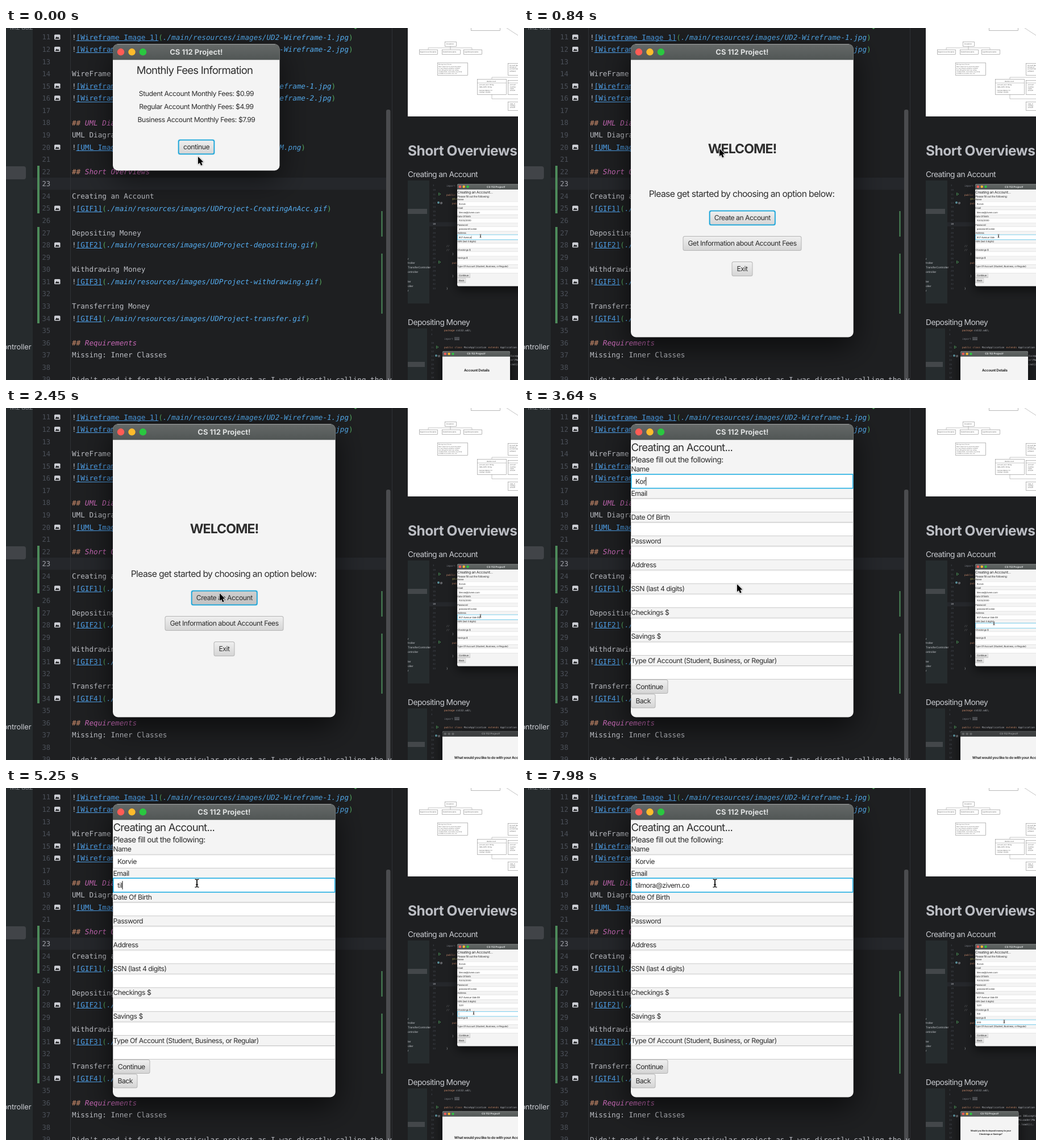
Write an HTML page with a canvas that moves like this. It is 901 px wide and 621 px high and loops after 8000 ms.

```html
<!DOCTYPE html>
<html lang="en">
<head>
<meta charset="utf-8">
<title>Account demo</title>
<style>
html, body { margin: 0; width: 100%; height: 100%; overflow: hidden; background: #1e1f21; }
canvas { display: block; width: 901px; height: 621px; }
</style>
</head>
<body>
<canvas id="stage"></canvas>
<script>
const W = 901, H = 621, LOOP = 8000, MINI = 0.349;
const canvas = document.getElementById('stage');
const dpr = window.devicePixelRatio || 1;
canvas.width = W * dpr;
canvas.height = H * dpr;
const ctx = canvas.getContext('2d');
const UI = 'Inter, "Open Sans", sans-serif';
const MONO = '"DejaVu Sans Mono", "Noto Sans Mono", monospace';
const ROW = 21.57, CODE = 12.65;
const BACK = '#1e1f21', BLUE = '#4fa3ee', PINK = '#c667b4', ORANGE = '#cf8e6d', GREY = '#bcbec4', GREEN = '#54a85f';

const NAME = 'Korvie', EMAIL = 'tilmora@zivem.com', ADDRESS = '907 Avenue Vale 09';
const LABELS = ['Name', 'Email', 'Date Of Birth', 'Password', 'Address', 'SSN (last 4 digits)',
  'Checkings $', 'Savings $', 'Type Of Account (Student, Business, or Regular)'];

const KEYS = {
  name: [3220, 3430, 3640, 3780, 3850, 3920],
  email: [4900, 4970, 5250, 5460, 5530, 5740, 6230, 6440, 7000, 7140, 7350, 7560, 7630, 7770, 7840, 7980],
  address: [70, 210, 420, 560, 700, 1820, 1890, 2170],
  ssn: [3780, 3850, 3920, 4130],
  checkings: [5950, 6090, 6440],
  savings: [7560, 7700, 7840]
};
// [time, x, y]
const MOUSE = [[0, 338, 227], [280, 342, 220], [420, 342, 220], [560, 344, 213], [840, 344, 213],
  [1260, 499, 250], [2030, 499, 250], [2380, 376, 327], [2520, 376, 327], [2590, 375, 311],
  [4130, 375, 311], [4690, 336, 168]];
const MINI_MOUSE = [[0, 835, 367], [2590, 835, 367], [2800, 827, 380], [4130, 827, 380], [4620, 823, 397],
  [6440, 823, 397], [6700, 823, 412], [7700, 823, 412], [7980, 845, 412]];

const pressed = (keys, t) => keys.filter(k => k <= t).length;
const typed = (str, keys, t, base = 0) => str.slice(0, base + pressed(keys, t));

function along(path, t) {
  const i = path.findIndex(p => p[0] > t);
  if (i < 0) return path[path.length - 1].slice(1);
  const a = path[i - 1], b = path[i];
  const u = (t - a[0]) / (b[0] - a[0]), e = u * u * (3 - 2 * u);
  return [a[1] + (b[1] - a[1]) * e, a[2] + (b[2] - a[2]) * e];
}

function rect(x, y, w, h, color) {
  ctx.fillStyle = color;
  ctx.fillRect(x, y, w, h);
}

function round(x, y, w, h, r, color) {
  ctx.beginPath();
  ctx.roundRect(x, y, w, h, r);
  ctx.fillStyle = color;
  ctx.fill();
}

function line(color, width, ...pts) {
  ctx.beginPath();
  pts.forEach(([x, y]) => ctx.lineTo(x, y));
  ctx.strokeStyle = color;
  ctx.lineWidth = width;
  ctx.stroke();
}

function dot(x, y, r, color) {
  ctx.beginPath();
  ctx.arc(x, y, r, 0, 7);
  ctx.fillStyle = color;
  ctx.fill();
}

// y is the middle of the capitals
function text(str, x, y, size, { color = '#2d2d2d', weight = 400, align = 'left', track = -0.04 } = {}) {
  ctx.font = `${weight} ${size}px ${UI}`;
  ctx.letterSpacing = track * size + 'px';
  ctx.fillStyle = color;
  const w = ctx.measureText(str).width;
  const dx = align === 'center' ? w / 2 : align === 'right' ? w : 0;
  ctx.fillText(str, x - dx, y + size * 0.364);
  return w;
}

function code(str, x, y, color = GREY, style = '', size = CODE) {
  ctx.font = `${style} ${size}px ${MONO}`;
  ctx.letterSpacing = '0px';
  ctx.fillStyle = color;
  ctx.fillText(str, x, y + size * 0.364);
  return x + ctx.measureText(str).width;
}

function link(label, path, y) {
  let x = code('!', 116, y);
  const end = code(`[${label}]`, x, y, BLUE);
  rect(x, Math.round(y + 5.7), end - x, 1, BLUE);
  x = code('(', end, y, GREEN);
  x = code('./main/resources/images/' + path, x, y, '#55adf0', 'italic');
  code(')', x, y, GREEN);
}

function heading(str, y) {
  code(str, code('## ', 116, y, ORANGE), y, PINK, 'italic');
}

function picture(x, y) {
  round(x - 5, y - 4.5, 10.5, 9, 1.5, '#ced0d6');
  ctx.beginPath();
  ctx.moveTo(x - 3.5, y + 3);
  ctx.lineTo(x - 1, y - 1);
  ctx.lineTo(x + 0.7, y + 1);
  ctx.lineTo(x + 2, y - 0.5);
  ctx.lineTo(x + 4, y + 3);
  ctx.fillStyle = BACK;
  ctx.fill();
}

function editor() {
  const at = n => 16 + (n - 11) * ROW;
  rect(0, 0, W, H, BACK);
  rect(0, 0, 47, H, '#262b2d');
  round(-6, 244, 41, 23, 4, '#414448');
  text('M2 uu2', 47, -1, 12, { color: '#777b80', align: 'right' });
  text('ontroller', 44.5, 562, 13, { color: '#ced0d6', align: 'right', track: -0.01 });
  ctx.save();
  ctx.beginPath();
  ctx.rect(47, 0, 632, H);
  ctx.clip();
  rect(47, 264, 622, 21.5, '#25272b');
  rect(113, 0, 1, H, '#303236');
  const pics = [11, 12, 15, 16, 20, 25, 28, 31, 34];
  for (let n = 11; n < 40; n++) {
    code(String(n), 63.5, at(n), n === 23 ? '#a1a3ab' : '#4b5059', '', 12.2);
    if (pics.includes(n)) picture(90, at(n));
  }
  rect(55, 243, 4, 84, '#4d8a5a');
  rect(55, 351, 4, 170, '#4d8a5a');
  for (const i of [1, 2]) {
    link('Wireframe Image ' + i, `UD2-Wireframe-${i}.jpg`, at(10 + i));
    link('Wireframe ' + i, `UD2-MyWireframe-${i}.jpg`, at(14 + i));
  }
  code('WireFrame Images', 116, at(14));
  heading('UML Diagram', at(18));
  code('UML Diagram:', 116, at(19));
  link('UML Image', 'UD2-DiagramM.png', at(20));
  heading('Short Overviews', at(22));
  [['Creating an Account', 'CreatingAnAcc'], ['Depositing Money', 'depositing'],
   ['Withdrawing Money', 'withdrawing'], ['Transferring Money', 'transfer']].forEach(([title, file], i) => {
    code(title, 116, at(24 + 3 * i));
    link('GIF' + (i + 1), `UDProject-${file}.gif`, at(25 + 3 * i));
  });
  heading('Requirements', at(36));
  code('Missing: Inner Classes', 116, at(37));
  round(669, 144, 7.5, 490, 3, '#4b4c4f');
  code("Didn't need it for this particular project as I was directly calling the view", 116, at(39));
  ctx.restore();
  line(GREEN, 1.5, [611, -2], [615, 1], [621, -3]);
  rect(660.5, 323, 2, 45, '#4d8a5a');
  rect(660.5, 398, 2, 106, '#4d8a5a');
  rect(679, 0, 1, H, '#2f3135');
}

function box(x, y, w, h) {
  ctx.strokeStyle = '#8a8a8a';
  ctx.lineWidth = 0.6;
  ctx.strokeRect(x + 0.5, y + 0.5, w, h);
}

function diagram() {
  ctx.save();
  ctx.beginPath();
  ctx.rect(707, 0, 194, 156);
  ctx.clip();
  rect(707, 0, 194, 156, '#fff');
  const note = (str, x, y, size = 2.6) => text(str, x, y, size, { color: '#444', track: 0 });
  const lines = (rows, x, y, size) => rows.forEach((s, i) => note(s, x, y + i * 3.2, size));
  box(818, -6, 51, 10);
  box(772, 24, 20, 8);
  note('Exceptions', 775, 28.5);
  line('#888', 0.5, [782, 32], [782, 38]);
  line('#888', 0.5, [743, 38], [743, 35], [820, 35], [820, 38]);
  [[727, 'RegularAccountException'], [767, 'StudentFeeException'], [805, 'LogInMoneyException']].forEach(([x, s]) => {
    box(x, 38, 32, 8);
    note(s, x + 1.5, 42.5, 2.4);
  });
  box(759, 61, 53, 22);
  lines(['Missing: Inner Classes', "Didn't need it for this particular project", 'as I was directly calling the variables',
    'and setting other data, was calling', 'variables/fields, which other may not be', 'available to use outer class. For'], 761, 64.5, 2.2);
  box(829, 90, 51, 27);
  line('#888', 0.5, [829, 97], [880, 97]);
  note('BankAccount', 846, 93.7);
  lines(['- account_num: String', '- SSN_DATE: String', '', '- businessName: int', '- savings: double'], 831, 100.5);
  line('#888', 0.5, [855, 90], [855, 87], [901, 87]);
  box(883, 62, 30, 21);
  lines(['Account fees:', 'all type of', 'account fees', 'setFees()'], 886, 66);
  box(883, 92, 30, 25);
  line('#888', 0.5, [883, 97], [901, 97]);
  lines(['- account', '- monthly:', '- name', '- amount'], 885, 100.5);
  line('#888', 0.5, [855, 117], [855, 125], [901, 125]);
  line('#888', 0.5, [881, 0], [901, 13]);
  box(883, 130, 30, 15);
  lines(['- date_of', '- savings', '- amount'], 885, 134);
  ctx.restore();
}

// a dark code shot at mini scale: side panel, selection and snippets [x, y, text, colour]
function shot(top, bottom, panel, mark, snippets) {
  ctx.beginPath();
  ctx.rect(707, top, 194, bottom - top);
  ctx.clip();
  rect(707, top, 194, bottom - top, BACK);
  rect(707, top, panel - 707, bottom - top, '#262c2e');
  rect(707, mark, panel - 711, 9, '#43474a');
  snippets.forEach(([x, y, s, c]) => code(s, x, y, c || GREY, '', CODE * 0.35));
}

function run(x, y) {
  ctx.beginPath();
  ctx.moveTo(x - 1.5, y - 2.2);
  ctx.lineTo(x + 2, y);
  ctx.lineTo(x - 1.5, y + 2.2);
  ctx.closePath();
  ctx.strokeStyle = GREEN;
  ctx.lineWidth = 0.7;
  ctx.stroke();
}

function override(x, y) {
  dot(x, y, 2, '#5a8f9a');
  text('@', x + 3, y, 4.5, { color: GREY });
}

// k is the current drawing scale, needed because shadows ignore transforms
function frameWindow(x, y, w, h, k = 1, active = true, depth = 1) {
  ctx.save();
  ctx.shadowColor = `rgba(0,0,0,${0.66 * depth})`;
  ctx.shadowBlur = 52 * k * dpr;
  ctx.shadowOffsetY = 16 * k * dpr;
  round(x, y, w, h, 9, '#f4f4f4');
  ctx.restore();
  const bar = ctx.createLinearGradient(0, y, 0, y + 28);
  bar.addColorStop(0, active ? '#656968' : '#424445');
  bar.addColorStop(1, active ? '#515655' : '#393b3c');
  round(x, y, w, 28, [9, 9, 0, 0], bar);
  line('rgba(255,255,255,.28)', 1, [x + 8, y + 0.5], [x + w - 8, y + 0.5]);
  ['#ff5c55', '#fdbb2c', '#2ac840'].forEach((c, i) => dot(x + 14 + i * 19.5, y + 14, 6.2, active ? c : '#626465'));
  text('CS 112 Project!', x + w / 2, y + 13.8, 13, { color: active ? '#dfe1e1' : '#8d8f90', weight: 700, align: 'center', track: 0 });
}

function button(str, x, y, w, h, { focus = false, down = false } = {}) {
  const g = ctx.createLinearGradient(0, y, 0, y + h);
  g.addColorStop(0, down ? '#cfcfcf' : '#f0f0f0');
  g.addColorStop(1, down ? '#c2c2c2' : '#d4d4d4');
  if (focus) round(x - 0.7, y - 0.7, w + 1.4, h + 1.4, 4, '#8fd3ec');
  round(x, y, w, h, 3.5, focus ? '#1aa4d8' : '#b4b4b4');
  const b = focus ? 1.6 : 1;
  round(x + b, y + b, w - 2 * b, h - 2 * b, 2.5, g);
  text(str, x + w / 2, y + h / 2, 12.2, { align: 'center' });
}

function field(y, value, focus, caret) {
  const out = focus ? 0.6 : 0, b = focus ? 1.6 : 0.9;
  rect(188, y - out, 391.5, 25 + 2 * out, focus ? '#1fade2' : '#c4c4c4');
  rect(188 + b, y + b - out, 391.5 - 2 * b, 25 + 2 * out - 2 * b, '#fff');
  if (!focus) rect(189, y + 1, 389.5, 1.2, '#ececec');
  const w = value ? text(value, 196, y + 12.5, 12.2) : 0;
  if (caret) rect(196 + w, y + 5, 1, 15, '#111');
}

function fees(t) {
  frameWindow(188, 28.3, 293.5, 223.2, 1, true, 0.85 + 0.15 * Math.min(1, t / 280));
  text('Monthly Fees Information', 332, 74, 18.5, { align: 'center' });
  [['Student', 0], ['Regular', 4], ['Business', 7]].forEach(([kind, price], i) =>
    text(`${kind} Account Monthly Fees: $${price}.99`, 335, 116 + 23 * i, 12.2, { align: 'center', track: -0.036 }));
  button('continue', 303, 197, 64, 26, { focus: true, down: t >= 700 });
}

function welcome(t) {
  frameWindow(188, 28.3, 391.7, 517.2);
  text('WELCOME!', 384, 213, 23, { weight: 700, align: 'center' });
  text('Please get started by choosing an option below:', 383, 292, 15.7, { align: 'center' });
  button('Create an Account', 326, 322, 116.5, 26, { focus: true, down: t >= 2450 });
  button('Get Information about Account Fees', 279.5, 367, 209, 26);
  button('Exit', 365.5, 412, 37, 26);
}

function form(values, focus, caret, k = 1) {
  frameWindow(188, 28.3, 391.7, 517.2, k);
  text('Creating an Account...', 188.5, 69, 18.5);
  text('Please fill out the following:', 188.5, 91, 13.8);
  LABELS.forEach((label, i) => {
    const y = 108 + 42.15 * i;
    text(label, 188.5, y, 12.2);
    field(y + 8.8, values[i], i === focus, i === focus && caret);
  });
  button('Continue', 188, 479, 65.5, 25);
  button('Back', 188, 504.5, 43.5, 25);
}

function overview(t) {
  ctx.save();
  const side = [[407, 'r'], [414, 'troller'], [422, 'TransferController'], [430, 'ontroller'], [447, 'ler'], [455, 'oller'], [463, 'r']];
  shot(269, 486, 745, 319, [[775, 278, 'import', '#7a7e85'], [775, 294, 'public', ORANGE], [785, 301, '@Override', '#b3ae60'], [785, 309, 'public', ORANGE],
    [775, 384, '//', '#7a7e85'], [775, 391.5, '//', '#7a7e85'], [785, 398.5, '}'], [785, 414, 'public', ORANGE], [785, 437, '}'], [775, 459, '}']]);
  rect(745, 342.5, 156, 7.5, '#25272b');
  for (let i = 0; i < 25; i++) {
    const y = 278 + i * 7.55;
    code(String(i + (i > 0 ? 9 : 3)), 751, y, i === 9 ? '#ced0d6' : '#4b5059', '', 4);
  }
  run(763, 293);
  override(761, 308);
  run(763, 413);
  side.forEach(([y, s]) => text(s, 707, y, 4.7, { color: '#ced0d6', track: 0 }));
  ctx.save();
  ctx.translate(794, 275);
  ctx.scale(MINI, MINI);
  ctx.translate(-188, -28);
  const focus = t < 2730 ? 4 : t < 4550 ? 5 : t < 6650 ? 6 : 7;
  form([NAME, EMAIL, '10/03/2000', 'passwordCookie', typed(ADDRESS, KEYS.address, t, 10),
    typed('1231', KEYS.ssn, t), typed('100', KEYS.checkings, t), typed('200', KEYS.savings, t), ''],
    focus, t % 1000 < 600, MINI);
  ctx.restore();
  beam(...along(MINI_MOUSE, t), 0.42);
  ctx.restore();
}

function deposit(t) {
  const stage = t < 2310 ? 0 : t < 5460 ? 1 : 2;
  ctx.save();
  shot(530, 621, 741, 589, [[771, 533, 'package', ORANGE], [792, 533, 'cs112.ud2;'], [771, 548, 'import', '#7a7e85'],
    [771, 563, 'public class', ORANGE], [805.7, 563, 'MainApplication'], [848.5, 563, 'extends', ORANGE], [869.8, 563, 'Application {'],
    [781, 571, '@Override', '#b3ae60']]);
  rect(789, 545, 9, 6, '#46484c');
  code('...', 790, 548, GREY, '', 4.4);
  ['1', '3', '', '10', '11', '12', '13', '14', '15', '16', '17', '18'].forEach((n, i) => code(n, 748, 533 + i * 7.55, '#4b5059', '', 4));
  run(759, 563);
  override(757, 578);
  const tails = [['Exception {', 'or(MainApp', 'cmd()'], [], ['ws IOException {', 'MLLoader(Ma', 'r.load());']][stage];
  tails.forEach((s, i) => code(s, stage === 0 ? 888 : 870, 578 + i * 7.55, GREY, '', 4.43));
  ctx.save();
  ctx.translate(768, 570);
  ctx.scale(MINI, MINI);
  frameWindow(0, 0, [341, 488, 293][stage], 400, MINI, stage !== 1 || t >= 4340);
  const bold = { weight: 700, align: 'center' };
  if (stage === 0) text('Account Details', 173, 98, 18, bold);
  if (stage === 1) text('What would you like to do with your Account?', 244, 134, 18, bold);
  if (stage === 2) {
    text('Would you like to deposit money to your', 153, 99, 11.4, bold);
    text('Checkings or Savings?', 153, 115, 11.4, bold);
  }
  ctx.restore();
  ctx.restore();
}

function preview(t) {
  diagram();
  text('Short Overviews', 707, 216, 24.5, { color: '#bcbec4', weight: 700, track: -0.02 });
  const caption = { color: '#c9cbd0' };
  text('Creating an Account', 707, 258, 13.8, caption);
  text('Depositing Money', 707, 519, 13.8, caption);
  overview(t);
  deposit(t);
}

function beam(x, y, k = 1) {
  ctx.save();
  ctx.translate(x, y);
  ctx.scale(k, k);
  for (const [c, w] of [['#fff', 3], ['#111', 1.4]]) {
    line(c, w, [-3.5, -7], [-1, -6.6], [0, -5.5], [0, 5.5], [-1, 6.6], [-3.5, 7]);
    line(c, w, [3.5, -7], [1, -6.6], [0, -5.5], [0, 5.5], [1, 6.6], [3.5, 7]);
    line(c, w, [-2, 2.5], [2, 2.5]);
  }
  ctx.restore();
}

function arrow(x, y) {
  ctx.save();
  ctx.translate(x, y);
  ctx.beginPath();
  [[0, 0], [0, 13.2], [3, 10.4], [5.2, 15.6], [7.6, 14.6], [5.4, 9.6], [9.4, 9.4]].forEach(p => ctx.lineTo(...p));
  ctx.closePath();
  ctx.shadowColor = 'rgba(0,0,0,.35)';
  ctx.shadowBlur = 2 * dpr;
  ctx.lineJoin = 'round';
  ctx.strokeStyle = '#fff';
  ctx.lineWidth = 2;
  ctx.stroke();
  ctx.fillStyle = '#000';
  ctx.fill();
  ctx.restore();
}

function dialog(t) {
  if (t < 840) return fees(t);
  if (t < 2520) return welcome(t);
  const onEmail = t >= 4760;
  const keys = onEmail ? KEYS.email : KEYS.name;
  const last = Math.max(2520, ...keys.filter(k => k <= t));
  const caret = (t - last) % 1000 < 500 && t < 7980;
  form([typed(NAME, KEYS.name, t), typed(EMAIL, KEYS.email, t)], onEmail ? 1 : 0, caret);
}

function draw(t) {
  ctx.setTransform(dpr, 0, 0, dpr, 0, 0);
  ctx.textRendering = 'geometricPrecision';
  editor();
  preview(t);
  dialog(t);
  const [x, y] = along(MOUSE, t);
  if (t >= 4620) beam(x, y);
  else arrow(x, y);
}

const start = performance.now();
function tick() {
  // the picture advances in 70 ms steps
  const t = (performance.now() - start) % LOOP;
  draw(Math.floor(t / 70) * 70);
  requestAnimationFrame(tick);
}
tick();
</script>
</body>
</html>
```
